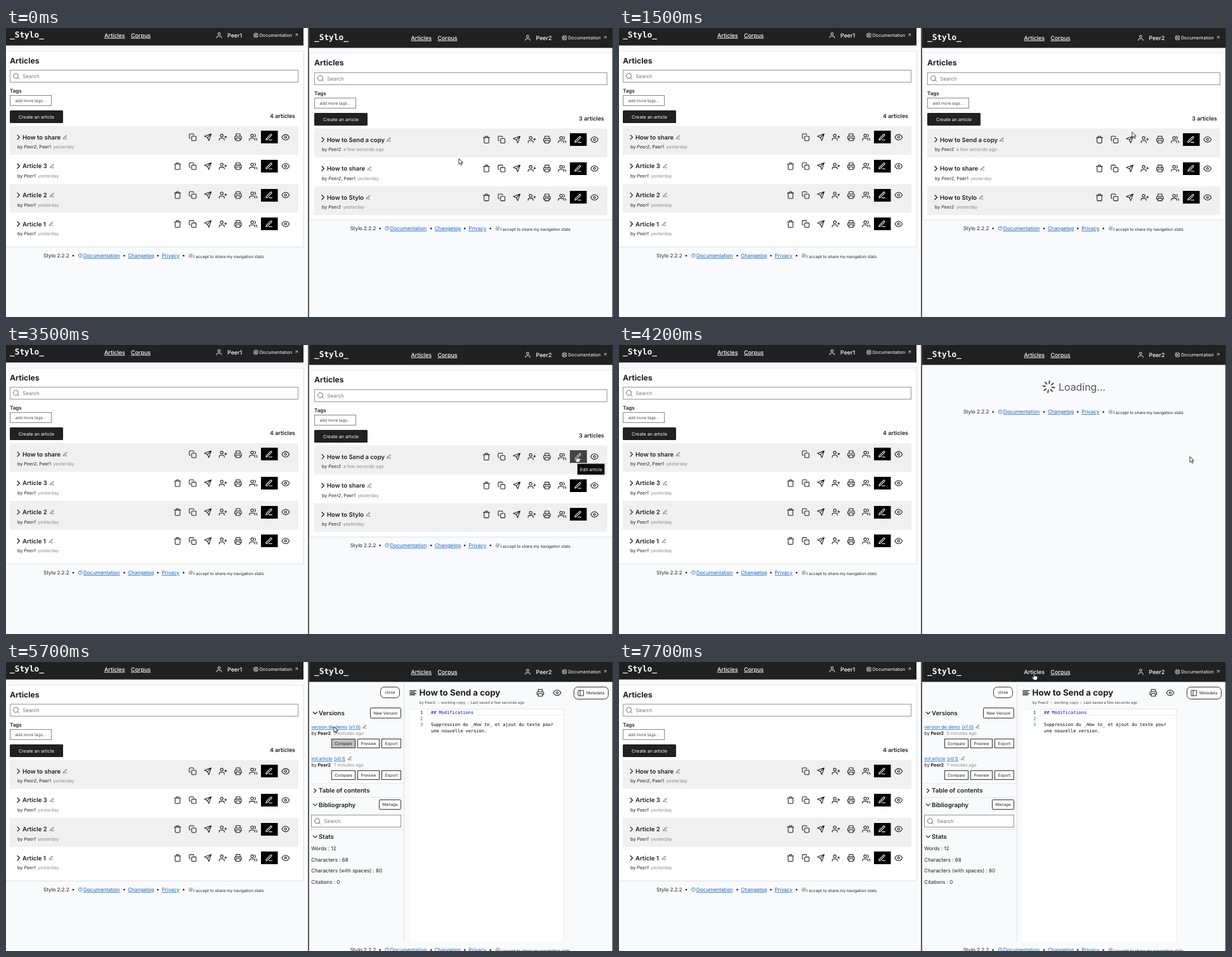
An HTML page that plays this animation: 957x456 px, repeating every 8000 ms.

```html
<!DOCTYPE html>
<html lang="en">
<head>
<meta charset="utf-8">
<title>Sharing articles</title>
<style>
html, body { margin: 0; width: 100%; height: 100%; overflow: hidden; background: #f9fafc; }
svg { display: block; width: 957px; height: 456px; }
text { font-family: Inter, "Noto Sans", sans-serif; text-rendering: geometricPrecision; }
.mono { font-family: "DejaVu Sans Mono", "Liberation Mono", monospace; }
.link { text-decoration: underline; }
.it { font-style: italic; }
</style>
</head>
<body>
<svg id="stage" viewBox="0 0 957 456"></svg>
<script>
const INK = '#1e1e1e', GREY = '#8c8c8c', BLUE = '#1566c0', PAGE = '#f9fafc', LINE = '#dedfe2', PINK = '#f3e6f1';
const LOOP = 8000, STEP = 100;

const ring = (x, y, r) => `M${x - r} ${y}a${r} ${r} 0 1 0 ${2 * r} 0a${r} ${r} 0 1 0 ${-2 * r} 0`;

const actions = {
  trash: 'M3 6h18M19 6v14a2 2 0 0 1-2 2H7a2 2 0 0 1-2-2V6m3 0V4a2 2 0 0 1 2-2h4a2 2 0 0 1 2 2v2',
  copy: 'M11 9h9a2 2 0 0 1 2 2v9a2 2 0 0 1-2 2h-9a2 2 0 0 1-2-2v-9a2 2 0 0 1 2-2zM5 15H4a2 2 0 0 1-2-2V4a2 2 0 0 1 2-2h9a2 2 0 0 1 2 2v1',
  send: 'M22 2L11 13M22 2l-7 20-4-9-9-4z',
  invite: 'M16 21v-2a4 4 0 0 0-4-4H5a4 4 0 0 0-4 4v2M20 8v6M23 11h-6' + ring(8.5, 7, 4),
  print: 'M6 9V2h12v7M6 18H4a2 2 0 0 1-2-2v-5a2 2 0 0 1 2-2h16a2 2 0 0 1 2 2v5a2 2 0 0 1-2 2h-2M6 14h12v8H6z'
};
const people = {
  group: 'M17 21v-2a4 4 0 0 0-4-4H5a4 4 0 0 0-4 4v2M23 21v-2a4 4 0 0 0-3-3.87M16 3.13a4 4 0 0 1 0 7.75' + ring(9, 7, 4),
  user: 'M20 21v-2a4 4 0 0 0-4-4H8a4 4 0 0 0-4 4v2' + ring(12, 7, 4),
  eye: 'M1 12s4-8 11-8 11 8 11 8-4 8-11 8-11-8-11-8z' + ring(12, 12, 3)
};
const signs = {
  pen: 'M12 20h9M16.5 3.5a2.1 2.1 0 0 1 3 3L7 19l-4 1 1-4z',
  right: 'M9 18l6-6-6-6',
  down: 'M6 9l6 6 6-6',
  out: 'M7 17L17 7M7 7h10v10',
  search: 'M21 21l-4.35-4.35' + ring(11, 11, 8),
  help: 'M9.1 9a3 3 0 0 1 5.8 1c0 2-3 3-3 3M12 17h.01' + ring(12, 12, 10),
  lines: 'M17 10H3M21 6H3M21 14H3M17 18H3',
  panel: 'M3 3h18v18H3zM9 3v18',
  buoy: 'M5 5l4 4M15 15l4 4M15 9l4-4M5 19l4-4' + ring(12, 12, 10) + ring(12, 12, 4),
  loader: 'M12 2v4M12 18v4M5 5l2.8 2.8M16.2 16.2l2.8 2.8M2 12h4M18 12h4M5 19l2.8-2.8M16.2 7.8L19 5'
};
const paths = { ...actions, ...people, ...signs };

// Text is placed by the vertical centre of its capitals.
function text(x, y, str, size, { fill = INK, weight = 400, anchor = 'start', cls = '' } = {}) {
  return `<text x="${x}" y="${y + size * 0.364}" font-size="${size}" font-weight="${weight}" fill="${fill}" text-anchor="${anchor}" class="${cls}">${str}</text>`;
}
function rect(x, y, w, h, fill, stroke = 'none', r = 0) {
  return `<rect x="${x}" y="${y}" width="${w}" height="${h}" rx="${r}" fill="${fill}" stroke="${stroke}"/>`;
}
// A box whose one-pixel border falls on whole pixels.
function box(x, y, w, h, fill, stroke, r = 0) {
  return rect(Math.round(x) + 0.5, Math.round(y) + 0.5, w - 1, h - 1, fill, stroke, r);
}
function icon(name, x, y, size = 12.8, color = INK, width = 2) {
  const k = size / 24;
  return `<path d="${paths[name]}" transform="translate(${x - size / 2} ${y - size / 2}) scale(${k})" fill="none" stroke="${color}" stroke-width="${width}" stroke-linecap="round" stroke-linejoin="round"/>`;
}
const span = (str, fill, cls = '', dx = 0) => `<tspan dx="${dx}" fill="${fill}" class="${cls}">${str}</tspan>`;

function navLink(x, y, label, cls = 'link') {
  return text(x, y, label, 8.9, { fill: '#fff', weight: 500, cls });
}

function header(x, y, w, h, dx, name) {
  return rect(x, 0, w, h, '#212121') +
    text(x ? 486 : 6, y - 1, '_Stylo_', 12.8, { fill: '#fff', weight: 700, cls: 'mono' }) +
    navLink(x ? 680.5 : 197, y, 'Corpus') +
    icon('user', 336 + dx, y, 11, '#fff') +
    navLink(349 + dx, y, name, '') +
    icon('buoy', 394 + dx, y, 8.5, '#fff') +
    text(399.7 + dx, y, 'Documentation', 7.2, { fill: '#fff' }) +
    icon('out', 458 + dx, y - 0.5, 7.5, '#fff');
}

function footer(dx, y) {
  const link = { fill: BLUE, cls: 'link' };
  const dot = x => `<circle cx="${x + dx}" cy="${y + 0.3}" r="1.3" fill="${INK}"/>`;
  return text(59 + dx, y, 'Stylo 2.2.2', 8) + [106, 186.5, 239.5, 280].map(dot).join('') +
    icon('help', 117.3 + dx, y, 7.5, BLUE) +
    text(122 + dx, y, 'Documentation', 8, link) +
    text(192.2 + dx, y, 'Changelog', 8, link) +
    text(245.5 + dx, y, 'Privacy', 8, link) +
    rect(288.5 + dx, y - 2.6, 5.6, 5.6, '#d4d4d4', '#b5b5b5', 1) +
    `<path d="M${289.8 + dx} ${y + 0.3}l1.2 1.3 2-2.7" fill="none" stroke="#777" stroke-width=".9"/>` +
    text(295.8 + dx, y + 1.3, 'I accept to share my navigation stats', 6.4);
}

function searchBox(x, y, w) {
  return box(x, y, w, 20, '#fff', '#969696') +
    icon('search', x + 10, y + 10, 12, '#666') + text(x + 20.3, y + 10, 'Search', 8, { fill: '#757575' });
}

function row(x, y, w, item, shaded) {
  const end = x + w, cy = y + 17.6;
  let out = shaded ? rect(x, y, w, 45.6, '#f0f0f0') : '';
  out += icon('right', x + 13.7, cy, 14, INK, 2.2) + text(x + 20, cy, item.title, 9.5, { weight: 600 }) +
    icon('pen', x + item.pen, cy, 7.8, '#333');
  out += text(x + 12, y + 33, `by ${span(item.by, INK, 'it')}${item.also ? ', ' + item.also : ''} ${span(item.when || 'yesterday', GREY, '', 1.5)}`, 7.2);
  ['trash', 'copy', 'send', 'invite', 'print', 'group'].forEach((name, i) => {
    if (name !== 'trash' || !item.shared) out += icon(name, end - 190.5 + i * 23.85, cy);
  });
  return out + rect(end - 59, Math.round(cy - 10), 26.5, 20, '#000') + icon('pen', end - 46.3, cy, 12.8, '#fff') + icon('eye', end - 20.2, cy);
}

function list(x, y, w, items) {
  return text(x, y + 0.2, 'Articles', 12.2, { weight: 700 }) + searchBox(x, y + 15, w) +
    text(x, y + 48.5, 'Tags', 8, { weight: 600 }) +
    box(x, y + 55, 66, 17, '#fff', '#888') +
    text(x + 33, y + 63.5, 'add more tags...', 6.4, { fill: '#444', anchor: 'middle' }) +
    rect(x, Math.round(y + 79.2), 84, 20, '#212121', 'none', 1.5) +
    text(x + 42, y + 89.3, 'Create an article', 7.2, { fill: '#fff', anchor: 'middle' }) +
    text(x + w - 5, y + 87.8, `${items.length} articles`, 8.9, { weight: 600, anchor: 'end' }) +
    items.map((it, i) => row(x, y + 103.8 + i * 45.6, w, it, i % 2 === 0)).join('');
}

function button(x, y, w, h, label, { id = '', r = 1 } = {}) {
  return `<g ${id && `id="${id}"`}>${box(x, y, w, h, '#fff', '#333', r)}</g>` +
    text(x + w / 2, y + h / 2, label, 6.4, { anchor: 'middle' });
}

function version(y, title, tag, tagX, penX, age, id) {
  const link = { fill: BLUE, cls: 'link' };
  return text(481.5, y, title, 7.15, link) + text(tagX, y, tag, 7.15, link) + icon('pen', penX, y - 0.5, 7, '#333') +
    text(481.5, y + 10.2, 'by', 7.2) + text(491.5, y + 10.2, 'Peer2', 7.2, { weight: 700 }) +
    text(516.5, y + 10.2, age, 7.15, { fill: GREY }) +
    button(513, y + 18.5, 38, 15, 'Compare', { id, r: 0 }) + button(554, y + 18.5, 35, 15, 'Preview', { r: 0 }) +
    button(592, y + 18.5, 31, 15, 'Export', { r: 0 });
}

function section(y, label, open) {
  return icon(open ? 'down' : 'right', 487.3, y, 12, INK, 2.2) + text(493, y, label, 9.6, { weight: 600 });
}

function editor() {
  const code = (x, y, str, opt = {}) => text(x, y, str, 6.97, { fill: '#000', cls: 'mono', ...opt });
  const num = (y, n, fill) => code(657.3, y, n, { fill, anchor: 'end' });
  let out = rect(627, 31, 1, 410, LINE) + [191, 213, 264].map(y => rect(478, y, 150, 0.8, '#e4e5e8')).join('');
  out += button(590, 39, 31, 18, 'close', { r: 6 }) +
    section(80.5, 'Versions', true) + button(574, 72, 49, 17, 'New Version') +
    version(102.5, 'version de demo', '(v1.0)', 540.5, 565.5, '5 minutes ago', 'compare') +
    version(152.5, 'init article', '(v0.1)', 517, 542, '7 minutes ago') +
    section(203, 'Table of contents', false) +
    section(225.3, 'Bibliography', true) + button(588, 217, 35, 16, 'Manage') +
    searchBox(481, 241.3, 142) + section(275.7, 'Stats', true);
  ['Words : 12', 'Characters : 68', 'Characters (with spaces) : 80', 'Citations : 0'].forEach((s, i) => {
    out += text(481.3, 294.5 + i * 17.45, s, 8);
  });
  out += icon('lines', 641.7, 48.7, 13, INK, 2.4) + text(651.5, 48.5, 'How to Send a copy', 13.3, { weight: 700 }) +
    text(652, 63.8, 'by Peer2', 5.95, { fill: '#444' }) + text(680.5, 63.8, '-', 5.95) +
    text(686, 63.8, 'working copy', 5.95, { fill: '#444' }) + text(727, 63.8, '-', 5.95) +
    text(732.5, 63.8, 'Last saved a few seconds ago', 5.97, { fill: '#444' }) +
    icon('print', 842.4, 48.6) + icon('eye', 869, 48.6) +
    box(895, 39, 55, 20, '#fff', '#333', 6) + icon('panel', 906.5, 49, 11) + text(915, 49, 'Metadata', 6.4);
  out += rect(636, 74, 244, 367, '#fff') + rect(664.5, 74.5, 215, 9.3, '#fff', '#ececec') +
    rect(636, 73.7, 244, 0.7, '#e6e6e6') + rect(879.3, 74, 0.7, 367, '#e2e2e2') +
    num(79.7, 1, '#0b216f') + num(89.2, 2, '#237893') + num(98.8, 3, '#237893') +
    code(670, 79.4, '## Modifications', { fill: '#00f' }) +
    code(670, 98.6, `Suppression du ${span('_How to_', '#000', 'it')} et ajout du texte pour`) +
    code(670, 108.2, 'une nouvelle version.');
  return out + footer(483.7, 454);
}

const group = (id, body) => `<g id="${id}">${body}</g>`;
const mine = [
  { title: 'How to share', pen: 87, by: 'Peer2', also: 'Peer1', shared: true },
  { title: 'Article 3', pen: 66.5, by: 'Peer1' },
  { title: 'Article 2', pen: 66.5, by: 'Peer1' },
  { title: 'Article 1', pen: 65, by: 'Peer1' }
];
const theirs = [
  { title: 'How to Send a copy', pen: 117.5, by: 'Peer2', when: 'a few seconds ago' },
  { title: 'How to share', pen: 87, by: 'Peer2', also: 'Peer1' },
  { title: 'How to Stylo', pen: 85, by: 'Peer2' }
];

document.getElementById('stage').innerHTML =
  rect(0, 0, 957, 456, PAGE) +
  rect(-1, 36.5, 470, 309, '#fff', LINE) + rect(0, 36, 469, 1, PINK) +
  header(0, 11.5, 469, 27.6, 0, 'Peer1') + navLink(155, 11.5, 'Articles') +
  list(6, 51, 455, mine) + footer(0, 359) +
  header(478, 15.5, 479, 31.4, 486.5, 'Peer2') +
  group('navIdle', navLink(638.5, 15.5, 'Articles')) + group('navHover', navLink(638.5, 15.5, 'Articles', '')) +
  group('list', rect(478, 39.5, 479, 263.5, '#fff', LINE) + rect(478, 39, 479, 1, PINK) +
    list(486, 54.7, 462, theirs) + footer(483.7, 316)) +
  group('hover', rect(889, 166, 26.5, 20, '#434343') + icon('pen', 901.7, 176.1, 12.8, '#e4e4e4')) +
  group('tip', rect(900.5, 187, 43.5, 18, '#0c0c0c', '#c9c9c9', 1) + text(922.4, 196, 'Edit article', 7, { fill: '#fff', anchor: 'middle' })) +
  group('loading', group('spin', icon('loader', 0, 0, 22, '#444', 2.1)) +
    text(693, 66.3, 'Loading...', 15.9, { fill: '#555' }) + footer(483.7, 105.3)) +
  group('editor', editor()) +
  rect(476.2, 0, 1.5, 456, '#222') + rect(956, 0, 1, 456, '#333') +
  group('arrow', '<path d="M0 0v9l2.1-1.9 1.5 3.2 1.5-.7-1.5-3.1h2.9z" fill="#fff" stroke="#222" stroke-width=".9" stroke-linejoin="round"/>') +
  group('hand', '<path d="M-.9 1v4.2l-1.2-1c-1-.6-1.7.3-1 1.1l2.6 3.6h5v-1l.8-2.6V3.6c0-.9-1.2-.9-1.4-.2 0-1-1.5-1.1-1.6-.2-.1-.9-1.5-.9-1.5 0V1c0-1.1-1.7-1.1-1.7 0z" fill="#fff" stroke="#222" stroke-width=".8" stroke-linejoin="round"/>');

// Pointer keys: time, x, y. Repeated places are rests.
const keys = [
  [0, 714, 206], [600, 714, 206], [1500, 809, 164], [1900, 797, 177], [2000, 797, 177], [2100, 798, 178], [2300, 798, 178],
  [2400, 801, 178], [2700, 801, 178], [2800, 900, 176], [4800, 900, 176], [4900, 734, 176], [5000, 734, 176], [5100, 690, 177],
  [5200, 690, 177], [5400, 583, 186], [5500, 583, 186], [5600, 528, 126], [5700, 517, 102], [6000, 545, 165], [6100, 545, 165],
  [6800, 541, 213], [7300, 541, 213], [7500, 686, 25], [7600, 686, 25], [7700, 654.5, 19.5], [8000, 654.5, 19.5]
];

function pointer(t) {
  const i = Math.max(1, keys.findIndex(k => k[0] >= t));
  const [t0, x0, y0] = keys[i - 1], [t1, x1, y1] = keys[i];
  const p = (t - t0) / (t1 - t0);
  return [x0 + (x1 - x0) * p, y0 + (y1 - y0) * p];
}

const el = id => document.getElementById(id);
const show = (id, on) => el(id).style.display = on ? '' : 'none';

function draw(now) {
  const t = Math.floor((now % LOOP) / STEP) * STEP;
  const during = (a, b) => t >= a && t < b;
  const [x, y] = pointer(t);
  const hand = during(1800, 4200) || t >= 7700;
  show('list', t < 4200);
  show('hover', during(2800, 4200));
  show('tip', during(3500, 3900));
  show('loading', during(4200, 4400));
  show('editor', t >= 4400);
  show('navIdle', t < 7700);
  show('navHover', t >= 7700);
  show('arrow', !hand);
  show('hand', hand);
  el('spin').setAttribute('transform', `translate(677.5 66) rotate(${8 + (t - 4200) * 0.18})`);
  el('compare').firstChild.setAttribute('fill', during(5600, 5800) ? '#bfbfbf' : '#fff');
  for (const id of ['arrow', 'hand']) el(id).setAttribute('transform', `translate(${x} ${y})`);
}

const start = performance.now();
function tick() {
  draw(performance.now() - start);
  requestAnimationFrame(tick);
}
tick();
</script>
</body>
</html>
```
